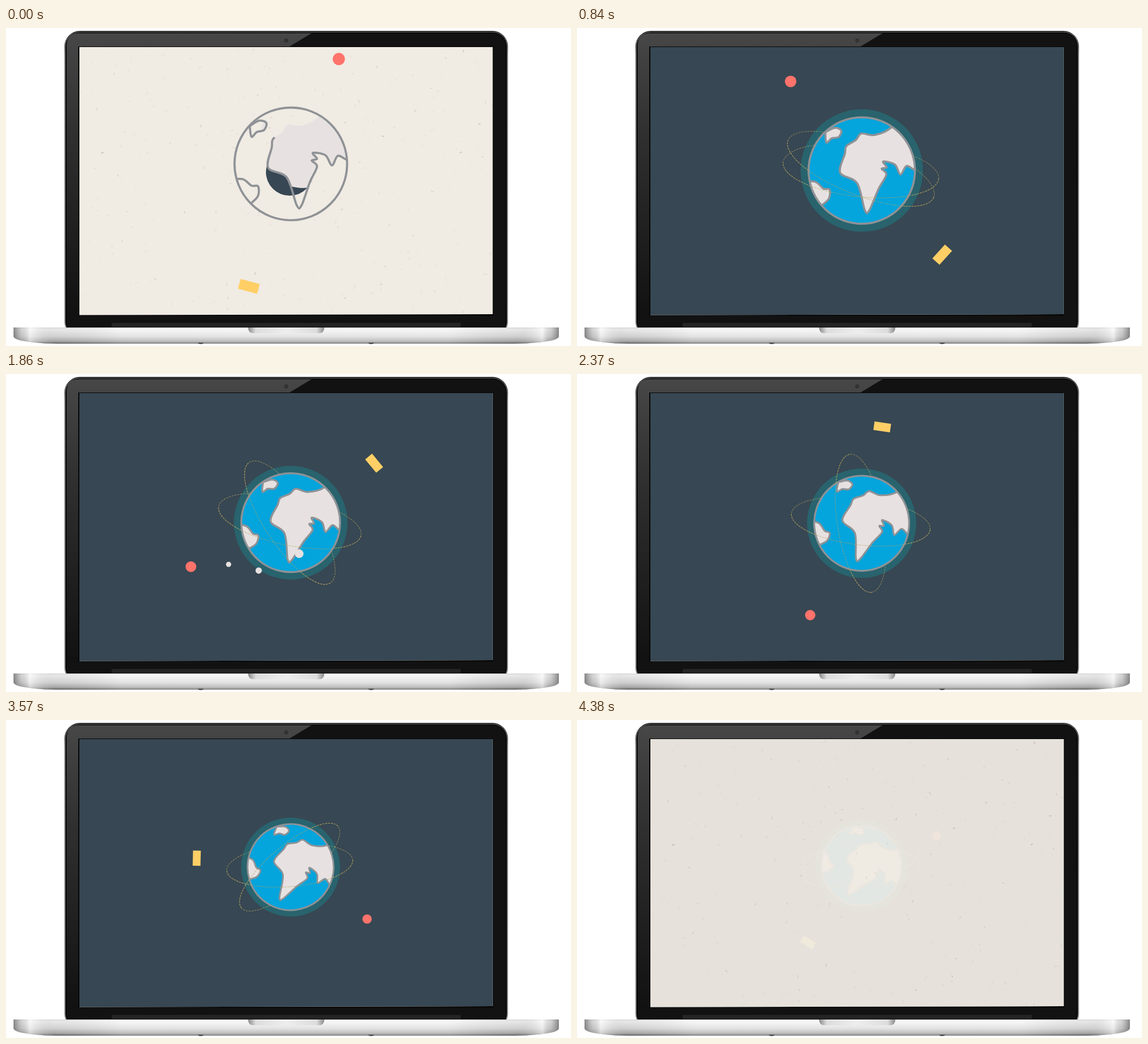
An HTML page that plays this animation: 978 by 550 pixels, repeating every 4.41 s.

```html
<!DOCTYPE html>
<html lang="en">
<head>
<meta charset="utf-8">
<title>Globe on a laptop</title>
<style>
html, body { margin: 0; width: 100%; height: 100%; overflow: hidden; background: #fff; }
svg { display: block; width: 978px; height: 550px; }
.line { fill: none; stroke: #8f9296; stroke-width: 3.6; stroke-linejoin: round; }
.orbit { fill: none; stroke: #b5a35f; stroke-opacity: .68; stroke-dasharray: 3.5 1.5; }
</style>
</head>
<body>
<svg viewBox="0 0 978 550">
  <defs>
    <linearGradient id="rim" x2="0" y2="1">
      <stop stop-color="#111"/><stop offset=".08" stop-color="#777"/><stop offset="1" stop-color="#8a8a8a"/>
    </linearGradient>
    <linearGradient id="glare" x2="0" y2="1">
      <stop stop-color="#474747"/><stop offset=".35" stop-color="#303030"/><stop offset="1" stop-color="#111"/>
    </linearGradient>
    <linearGradient id="metal" x2="0" y2="1">
      <stop stop-color="#ddd"/><stop offset=".1" stop-color="#f6f6f6"/><stop offset=".55" stop-color="#dadada"/>
      <stop offset=".85" stop-color="#a8a8a8"/><stop offset="1" stop-color="#555"/>
    </linearGradient>
    <linearGradient id="ends" x2=".5" spreadMethod="reflect">
      <stop stop-color="#555" stop-opacity=".7"/><stop offset=".03" stop-color="#888" stop-opacity=".3"/>
      <stop offset=".06" stop-color="#fff" stop-opacity=".5"/><stop offset=".15" stop-color="#999" stop-opacity=".15"/>
      <stop offset=".4" stop-color="#fff" stop-opacity=".25"/>
    </linearGradient>
    <linearGradient id="notch" x2=".5" spreadMethod="reflect">
      <stop stop-color="#888"/><stop offset=".2" stop-color="#ddd"/><stop offset="1" stop-color="#eee"/>
    </linearGradient>
    <path id="base" d="M13 518H957V533Q957 540 925 543.500Q900 546 880 546H90Q65 546 45 543.500Q13 540 13 533Z"/>
    <clipPath id="screen"><path d="M127 33H842.500V495L127 496.500Z"/></clipPath>
    <clipPath id="ball"><circle cx="493" cy="241.5" r="94.5"/></clipPath>
    <clipPath id="reveal"><circle id="revealDisc" cx="514" cy="207"/></clipPath>
    <g id="land"><path id="mainland" pathLength="1"/><path id="north"/><path id="south"/></g>
  </defs>

  <!-- laptop -->
  <rect x="101" y="5" width="768" height="530" rx="27" fill="url(#rim)"/>
  <rect x="102.500" y="7" width="765" height="526" rx="25" stroke="#9a9a9a" stroke-width=".8"/>
  <rect x="104.500" y="9" width="761" height="520" rx="22" fill="#121212"/>
  <path d="M105 500V31Q105 9 127 9H529L489 33H127V500Z" fill="url(#glare)"/>
  <rect x="125" y="32" width="719" height="465.500" fill="#070707"/>
  <circle cx="485" cy="21.500" r="3" fill="#343434" stroke="#2c2c2c"/>
  <rect x="183" y="510" width="604" height="7" fill="#242424"/>
  <use href="#base" fill="url(#metal)"/>
  <use href="#base" fill="url(#ends)"/>
  <path d="M419 518H551Q551 528 541 528H429Q419 528 419 518Z" fill="url(#notch)"/>
  <path d="M332 544.500h10q-1 2-5 2t-5-2zM627 544.500h10q-1 2-5 2t-5-2z" fill="#333"/>

  <g clip-path="url(#screen)">
    <g id="paper"><rect x="127" y="33" width="716" height="464" fill="#f0ebe3"/><g id="fibres"></g></g>
    <circle id="night" cx="491" cy="249" fill="#374753"/>
    <line id="streak" stroke="#77756a" stroke-width="1.6"/>
    <circle id="pulse" fill="none" stroke="#29636d"/>
    <circle id="glow" fill="#29636d"/>
    <g class="orbits"><ellipse class="orbit"/><ellipse class="orbit"/></g>
    <g id="globe">
      <circle id="sea" cx="493" cy="241.5" fill="#04a4dc"/>
      <g clip-path="url(#ball)">
        <g clip-path="url(#reveal)"><use href="#land" fill="#e7e2e1"/></g>
        <use href="#land" class="line"/>
      </g>
      <circle class="line" cx="493" cy="241.5" r="94.5"/>
    </g>
    <g class="orbits"><path class="orbit"/><path class="orbit"/></g>
    <circle id="moon" r="2" fill="#eee"/>
    <g id="dots" fill="#e7e2e1"><circle/><circle/><circle/></g>
    <circle id="ruby" fill="#ff736b"/>
    <rect id="card" x="-.175" y="-.09" width=".35" height=".18" fill="#ffcf66"/>
    <use id="veil" href="#paper"/>
  </g>
</svg>
<script>
const LOOP = 4410;
const $ = id => document.getElementById(id);
const set = (el, attrs) => { for (const k in attrs) el.setAttribute(k, attrs[k]); };
const clamp = x => Math.max(0, Math.min(1, x));
const rad = degrees => degrees * Math.PI / 180;

// Smooth curve through "x,y x,y ..." points
function curve(text) {
  const p = text.split(' ').map(s => s.split(',').map(Number));
  const at = i => p[Math.max(0, Math.min(p.length - 1, i))];
  let d = 'M' + p[0];
  for (let i = 0; i < p.length - 1; i++) {
    const [a, b, c, e] = [at(i - 1), at(i), at(i + 1), at(i + 2)];
    d += 'C' + b.map((v, k) => v + (c[k] - a[k]) / 6) + ' ' + c.map((v, k) => v - (e[k] - b[k]) / 6) + ' ' + c;
  }
  return d;
}

set($('mainland'), { d: curve('560,125 541,161 512,177 488,176 479,188 463,200 461,214 455,248 486,264 503,311 511,311 ' +
  '525,272 537,246 528,236 537,233 530,223 551,227 562,244 572,228 588,235 620,244') });
set($('north'), { d: curve('424,178 440,169 452,173 448,185 436,188 427,196 424,178') });
set($('south'), { d: curve('388,268 412,267 427,278 438,279 438,295 426,308 408,325') });

let seed = 7;
const rnd = () => (seed = seed * 16807 % 2147483647) / 2147483647;
const bend = () => (rnd() - .5) * 8;
let fibres = '';
for (let i = 0; i < 400; i++)
  fibres += `<path d="M${127 + rnd() * 716} ${33 + rnd() * 463}q${bend()} ${bend()} ${bend()} ${bend()}" ` +
    `fill="none" stroke="#a89a90" stroke-width="${.5 + rnd() * .6}" opacity="${.12 + rnd() ** 4 * .5}"/>`;
$('fibres').innerHTML = fibres;

const [backOrbits, frontOrbits] = document.querySelectorAll('.orbits');

function draw(t) {
  const s = t / 1000;
  const cx = 493 - s / 9;
  const cy = 253 - 18 * Math.exp(-s / 2) * Math.cos(s * 1.18);
  const r = 98 - 6.5 * s;
  const polar = (angle, dist) => [cx + dist * Math.cos(rad(angle)), cy + dist * Math.sin(rad(angle))];

  set($('night'), { r: 41 + 470 * clamp(s / .33) ** 1.6 });
  set($('veil'), { opacity: clamp((s - 3.84) / .57) });

  const spin = 9 * Math.max(0, s - .42);
  set($('globe'), { transform: `translate(${cx} ${cy}) rotate(${spin}) scale(${r / 95}) translate(-493 -241.5)` });
  set($('sea'), { r: 94.5 * clamp((s - .06) / .24) });
  set($('revealDisc'), { r: 74 + t });
  const hidden = .26 * clamp(1 - s / .15);
  set($('mainland'), { 'stroke-dasharray': hidden ? '1 1' : 'none', 'stroke-dashoffset': -hidden });

  const arrive = clamp((s - .15) / .17);
  set($('glow'), { cx, cy, r: arrive && r * (.9 + .245 * arrive) });
  const wave = (s - .42) / .4;
  const strength = clamp(1 - wave);
  set($('pulse'), { cx, cy, r: 131 + 34 * wave, 'stroke-width': 18 * strength, opacity: s < .25 ? 0 : strength });

  // Two dashed orbits; the near half passes in front of the globe
  const a = 1.463 * r, b = .49 * r;
  const tilts = [49 * s - 35.2, 29.4 - 9.6 * s];
  tilts.forEach((tilt, i) => {
    const transform = `translate(${cx - 1.5} ${cy - 3 * i}) rotate(${tilt})`;
    set(backOrbits.children[i], { rx: a, ry: b, transform });
    set(frontOrbits.children[i], { d: `M${a} 0A${a} ${b} 0 0 1 ${-a} 0`, transform });
  });
  set(backOrbits, { opacity: arrive });
  set(frontOrbits, { opacity: arrive });

  const phase = rad(138 + (s - 4.08) * 100);
  set($('moon'), {
    cx: a * Math.cos(phase), cy: b * Math.sin(phase),
    transform: `translate(${cx} ${cy}) rotate(${tilts[0]})`,
    opacity: Math.abs(s - 4.08) < .12 ? 1 : 0
  });

  [...$('dots').children].forEach((dot, i) => {
    const u = i + (s - 1.86) / .15;
    set(dot, {
      cx: 385 + 43 * u + 9 * u * u, cy: 329 + 31 * u - 20 * u * u,
      r: (4.5 + .5 * u + .5 * u * u) * clamp(Math.min(3 - u, u + 1))
    });
  });

  const slide = (s - .42) * 150;
  set($('streak'), {
    x1: 682, y1: 486, x2: 694, y2: 495,
    transform: `translate(${slide} ${slide * .75})`,
    opacity: s > .33 && s < .51 ? 1 : 0
  });

  const [rx, ry] = polar(-65.3 - 76 * s + .85 * s * s, 199.5 - 3.1 * s * s);
  set($('ruby'), { cx: rx, cy: ry, r: r * .108 });

  const heading = 109 - 78.5 * s + 3.5 * Math.sin(2 * Math.PI * t / LOOP);
  const place = polar(heading, 161 + 63 * Math.exp(-((s / 1.5) ** 1.4)));
  set($('card'), { transform: `translate(${place}) rotate(${heading - 94}) scale(${r})` });
}

const start = performance.now();
function tick() {
  draw((performance.now() - start) % LOOP);
  requestAnimationFrame(tick);
}
tick();
</script>
</body>
</html>
```
